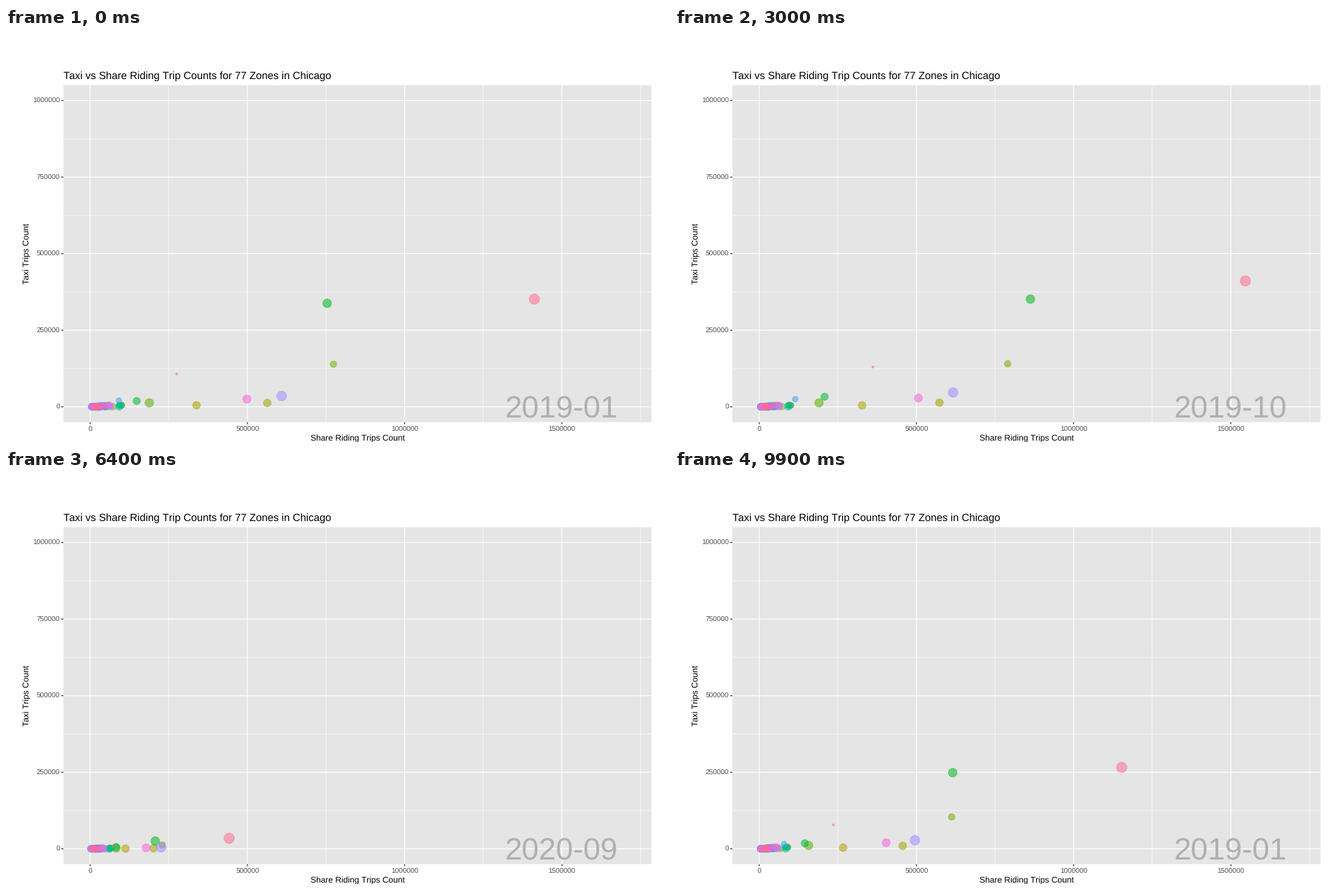
A matplotlib script that plays this animation: 947 by 592 pixels, repeating every 10 s.

```python
import numpy as np
import matplotlib.pyplot as plt
from matplotlib.animation import FuncAnimation
from matplotlib.patches import Rectangle

W, H, DPI = 947, 592, 100
PT = 72 / DPI
FRAMES, INTERVAL = 100, 100
ZONES, MONTHS = 77, 31
X0, Y0 = 120.2, 541.7          # pixel position of the data origin
DX, DY = 224.6, 109.5          # pixels per major step

plt.rcParams["font.family"] = "Liberation Sans"
plt.rcParams["text.hinting"] = "none"
plt.rcParams["text.hinting_factor"] = 1

# Three frames per month, a few months take one more.
gaps = np.full(MONTHS, 3)
gaps[[0, 4, 8, 13, 21, 25, 27]] += 1
holds = np.append(0, np.cumsum(gaps))

# Zones that leave the crowd, in pixels from the origin:
# zone: radius, rides in Jan 19, Jul 19 and Sep 20, taxis in Jan 19 and Jul 19
MOVERS = {
    75: (7.8, 634.5, 694.5, 198.5, 154, 180),
    25: (6.6, 338.5, 387.5, 93, 148, 154),
    20: (5.1, 347.5, 355, 103, 61, 61.5),
    55: (7.3, 273.5, 277, 101.5, 15.5, 20.5),
    66: (6.2, 224, 227.5, 80, 11, 12.5),
    16: (5.9, 253, 257.5, 90.5, 5.5, 6),
    14: (5.9, 152, 147, 50.5, 2.2, 2),
    22: (6.5, 84.5, 85.5, 37, 5.7, 5.7),
    26: (5.6, 66.5, 93.5, 37, 8.3, 14.5),
    73: (1.9, 123.5, 162.5, 32, 47, 57),
    51: (4.4, 41, 51.5, 14, 9, 11),
}
KEYS = [0, 2, 4, 6, 9, 12, 13, 14, 15, 20, 24, 25, 27, 30, 31]


def rides(jan, jul, sep):
    """Spring peak, collapse in April 2020, partial recovery."""
    win = 0.98 * jan + 0.35 * (jul - jan)
    low = 0.65 * sep ** 2 / jan
    feb = 0.87 * sep
    end = sep + 0.06 * jan + 0.8 * (jul - jan)
    return [jan, 0.565 * (jan + jul), 1.03 * jul, jul, jul, win, win, 0.58 * win,
            low, sep, feb, feb, 0.7 * feb + 0.3 * end, end, jan]


def taxis(jan, jul, level):
    """Like rides, but falling with the square of the ride level."""
    win = 0.92 * jan
    sep = jan * level ** 2
    return [jan, 0.5875 * (jan + jul), 1.09 * jul, jul, jul, win, 1.03 * win,
            0.54 * win, 0.25 * sep, sep, 0.85 * sep, 0.85 * sep, 1.55 * sep,
            2.75 * sep, jan]


def monthly(poses):
    return np.interp(np.arange(MONTHS + 1), KEYS, poses)


def hue_rgb(hue, lum=65, chroma=100):
    """Polar LUV colour as sRGB."""
    a = np.radians(hue)
    y = ((lum + 16) / 116) ** 3
    u = chroma * np.cos(a) / (13 * lum) + 0.1978
    v = chroma * np.sin(a) / (13 * lum) + 0.4683
    xyz = [9 * y * u / (4 * v), y, y * (12 - 3 * u - 20 * v) / (4 * v)]
    rgb = np.array([[3.2405, -1.5371, -0.4985],
                    [-0.9693, 1.8760, 0.0416],
                    [0.0556, -0.2040, 1.0572]]) @ xyz
    rgb = np.clip(rgb, 0, 1)
    return np.where(rgb > 0.00304, 1.055 * rgb ** (1 / 2.4) - 0.055, 12.92 * rgb)


rng = np.random.default_rng(7)
path = np.empty((MONTHS + 1, ZONES, 2))
radii = np.empty(ZONES)
for z in range(ZONES):
    u, h, r = rng.random(3)
    if z in MOVERS:
        radii[z], jan, jul, sep, t_jan, t_jul = MOVERS[z]
    else:
        span = 48 * min(1, (ZONES - z) / 45) ** 0.5
        jan = jul = 2.5 + span * u ** 1.5
        sep = 0.66 * jan
        t_jan = t_jul = 0.08 * h * jan
        radii[z] = 4.2 + 1.6 * r
    path[:, z, 0] = X0 + monthly(rides(jan, jul, sep))
    path[:, z, 1] = Y0 - monthly(taxis(t_jan, t_jul, sep / jan))

fig = plt.figure(figsize=(W / DPI, H / DPI), dpi=DPI, facecolor="white")
ax = fig.add_axes([0, 0, 1, 1])
ax.set_xlim(0, W)
ax.set_ylim(H, 0)
ax.axis("off")

L, R, T, B = 82, 922, 81.8, 563.6
ax.add_patch(Rectangle((L, T), R - L, B - T, fc="#e5e5e5", ec="none",
                       zorder=0, snap=False))


def line(x, y, width, color="white"):
    ax.plot(x, y, color=color, lw=width * PT, solid_capstyle="butt",
            zorder=1, snap=False)


def label(x, y, text, px, color="black", ha="center", **kw):
    return ax.text(x, y, text, fontsize=px * PT, color=color, ha=ha,
                   va="baseline", **kw)


for i in range(4):
    gx = X0 + (i + 0.5) * DX
    gy = Y0 - (i + 0.5) * DY
    line([gx, gx], [T, B], 0.6)
    line([L, R], [gy, gy], 0.6)
for i in range(4):
    gx = X0 + i * DX
    line([gx, gx], [T, B], 1.2)
    line([gx, gx], [B, B + 3], 1.2, "#333333")
    label(gx, 577, str(i * 500000), 9.76, "#4d4d4d")
for i in range(5):
    gy = Y0 - i * DY
    line([L, R], [gy, gy], 1.2)
    line([L - 3, L], [gy, gy], 1.2, "#333333")
    label(76.8, gy + 3.5, str(i * 250000), 9.76, "#4d4d4d", ha="right")

label(L, 73, "Taxi vs Share Riding Trip Counts for 77 Zones in Chicago", 14.63, ha="left")
label(502, 590.2, "Share Riding Trips Count", 12.2)
label(33.8, 322.6, "Taxi Trips Count", 12.2, rotation=90, rotation_mode="anchor")
date = label(712.9, 557.5, "", 44.2, "#b0b0b0", ha="left", zorder=2)

colors = [(*hue_rgb(15 + 355 * z / ZONES), 0.55) for z in range(ZONES)]
dots = ax.scatter(*path[0].T, s=(2 * (radii - 0.4) * PT) ** 2, facecolors=colors,
                  edgecolors=colors, linewidths=0.8 * PT, zorder=3)


def update(frame):
    phase = np.interp(frame, holds, np.arange(MONTHS + 1))
    k = int(phase)
    t = phase - k
    dots.set_offsets((1 - t) * path[k] + t * path[k + 1])
    month = int(phase + 0.5) % MONTHS
    date.set_text(f"{2019 + month // 12}-{month % 12 + 1:02d}")
    return dots, date


anim = FuncAnimation(fig, update, frames=FRAMES, interval=INTERVAL,
                     repeat=True, repeat_delay=0, blit=False)
plt.show()
```
